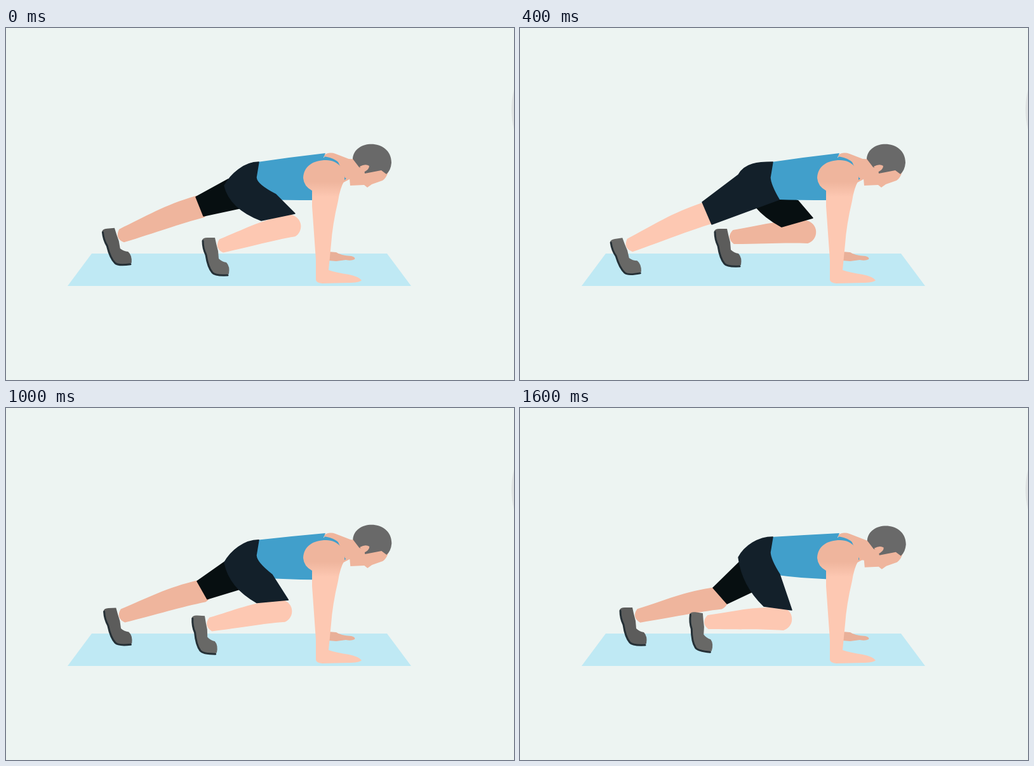
Recreate the animation shown at these times as an HTML page with a canvas. Size 800 px wide and 554 px high, loop 1700 ms.

```html
<!DOCTYPE html>
<html lang="en">
<head>
<meta charset="utf-8">
<title>Mountain climbers</title>
<style>
html, body { margin: 0; width: 100%; height: 100%; overflow: hidden; background: #edf4f2; }
canvas { display: block; }
</style>
</head>
<body>
<canvas id="stage" width="800" height="554"></canvas>
<script>
const ctx = document.getElementById('stage').getContext('2d');
const LOOP = 1700, STEP = 100;
const skin = '#fdc8b2', skinDark = '#efb59d', blue = '#419fcb';
const near = { skin, shorts: '#13202a', shoe: '#686866' };
const far = { skin: skinDark, shorts: '#070f11', shoe: '#5c5c5b' };

// Stride at each step: 1 = near knee forward, 0 = far knee forward
const stride = [1, .7, .4, .1, 0, .03, .22, .55, .87, 1, .93, .68, .37, .07, .05, .45, .82];

// Leg: knee xy, ankle xy, shoe degrees, rear hem xy, front hem xy, groin xy[, seat y]
const poses = [
  { at: 0,
    near: [296, 291, 173, 342, -8, 287, 274, 302, 309, 408, 270, 231],
    far: [452, 321, 336, 329, 0, 412, 313, 461, 299, 438, 272] },
  { at: .22,
    near: [316, 316, 190, 339, 1, 303, 296, 331, 322, 408, 263, 231],
    far: [398, 338, 285, 328, 8, 378, 326, 416, 327, 411, 260] },
  { at: .37,
    near: [332, 326, 207, 332, 5, 317, 303, 350, 323, 403, 257, 228],
    far: [365, 333, 251, 325, 9, 350, 322, 387, 325, 403, 257] },
  { at: .7,
    near: [388, 336, 270, 333, 10, 361, 313, 407, 323, 405, 262, 236],
    far: [322, 307, 198, 326, 3, 309, 292, 338, 312, 390, 272] },
  { at: .82,
    near: [414, 332, 296, 337, 8, 384, 312, 428, 318, 409, 262, 235],
    far: [314, 299, 187, 327, 0, 304, 283, 326, 308, 400, 273] },
  { at: 1,
    near: [450, 311, 339, 343, 0, 402, 303, 455, 292, 425, 262, 248],
    far: [306, 281, 182, 327, -5, 299, 266, 311, 296, 400, 277] }
];

function poseAt(q) {
  const i = Math.max(1, poses.findIndex(p => p.at >= q));
  const a = poses[i - 1], b = poses[i], k = (q - a.at) / (b.at - a.at);
  const blend = leg => a[leg].map((v, n) => v + (b[leg][n] - v) * k);
  return { near: blend('near'), far: blend('far'), lift: Math.sin(Math.PI * q) };
}

function fill(d, color) {
  ctx.fillStyle = color;
  ctx.fill(new Path2D(d));
}

function line(d, color, width) {
  ctx.strokeStyle = color;
  ctx.lineWidth = width;
  ctx.lineCap = ctx.lineJoin = 'round';
  ctx.stroke(new Path2D(d));
}

function placed(x, y, angle, draw) {
  ctx.save();
  ctx.translate(x, y);
  ctx.rotate(angle);
  draw();
  ctx.restore();
}

function lowerLeg([kx, ky, ax, ay, turn], look) {
  placed(ax - 2, ay, turn * Math.PI / 180, () => {
    fill('M-28-9Q-27-13-20-13L-8-13Q-6-3-3 8L-2 20Q3 25 10 26Q16 32 14 44Q4 49-8 45Q-16 41-20 22Z', look.shoe);
    line('M-27-8Q-27 4-22 14Q-19 34-12 42Q-8 47 12 46', '#253036', 3);
  });
  const len = Math.hypot(kx - ax, ky - ay), x = k => k * len;
  placed(ax, ay, Math.atan2(ky - ay, kx - ax), () => fill(
    `M0-11C${x(.35)}-15 ${x(.6)}-22 ${x(1)}-18A18.5 18.5 0 0 1 ${x(1)} 18
     C${x(.7)} 14 ${x(.4)} 14 0 11Q-12 0 0-11Z`, look.skin));
}

function thigh([, , , , , rx, ry, fx, fy, gx, gy, seat], look, waist) {
  const sx = seat ? 344 : 350, sy = seat || 238;
  const bulge = Math.max(0, rx - sx);
  const cx = (sx + rx) / 2 - bulge * .35, cy = (sy + ry) / 2 + bulge * .15;
  const rear = `${sx} ${sy}Q${cx} ${cy} ${rx} ${ry}L${fx} ${fy}L${gx} ${gy}`;
  const d = seat
    ? `M398 ${waist}C375 ${waist} ${sx + 10} ${sy - 18} ${rear}Q394 ${waist + 35} 394 ${waist + 24}Z`
    : `M${rear}Z`;
  fill(d, look.shorts);
  line(d, look.shorts, 1.5);
}

function scenery() {
  fill('M0 0H800V554H0Z', '#edf4f2');
  fill('M800 97Q792 128 800 160Z', '#dfe3e3');
  fill('M135 355H600L638 406H97Z', '#bfe9f4');
}

function torso(waist, lift) {
  fill('M500 201Q508 194 519 198L550 210L541 238L526 246Z', skinDark);
  fill(`M396 ${waist}Q450 ${203 - 6 * lift} 503 197L500 204Q524 208 534 238L520 260
        L486 ${271 - 3 * lift}Q440 ${271 - 6 * lift} 406 ${270 - 13 * lift}Q389 ${waist + 28} 396 ${waist}Z`, blue);
  line('M503 205Q529 209 533 236', blue, 5);
}

function head(lift) {
  placed(1.5 * lift, 5 * lift, 0, () => {
    fill('M518 199Q535 208 549 206L590 205L602 226Q599 236 593 240L576 246L569 251L564 247L542 248L541 237L534 236Z', skinDark);
    fill('M546 206C548 174 607 174 607 212Q606 224 599 230L591 224L565 229L564 222L556 219Z', '#696969');
    fill('M557 218Q566 213 572 217Q572 223 563 227Z', skinDark);
  });
}

function arm() {
  const tone = ctx.createLinearGradient(0, 242, 0, 266);
  tone.addColorStop(0, skinDark);
  tone.addColorStop(1, skin);
  fill(`M468 236C469 217 484 208 504 208C524 208 535 224 533 240Q526 252 523 272
        Q514 310 512 340L508 381Q520 385 540 388Q555 391 560 397Q556 401 538 401
        L498 402Q488 401 488 396L488 365L482 280L482 256Q469 249 468 236Z`, tone);
}

function render(time) {
  const q = stride[Math.floor(time % LOOP / STEP)];
  const pose = poseAt(q), waist = 211 - 15 * pose.lift;
  scenery();
  fill('M508 352L520 353Q527 358 544 359Q551 361 549 364Q544 367 535 365L520 367L508 366Z', '#e9b099');
  lowerLeg(pose.far, far);
  thigh(pose.far, far, waist);
  torso(waist, pose.lift);
  lowerLeg(pose.near, near);
  thigh(pose.near, near, waist);
  head(pose.lift);
  arm();
}

const start = performance.now();
function tick() {
  render(performance.now() - start);
  requestAnimationFrame(tick);
}
tick();
</script>
</body>
</html>
```
